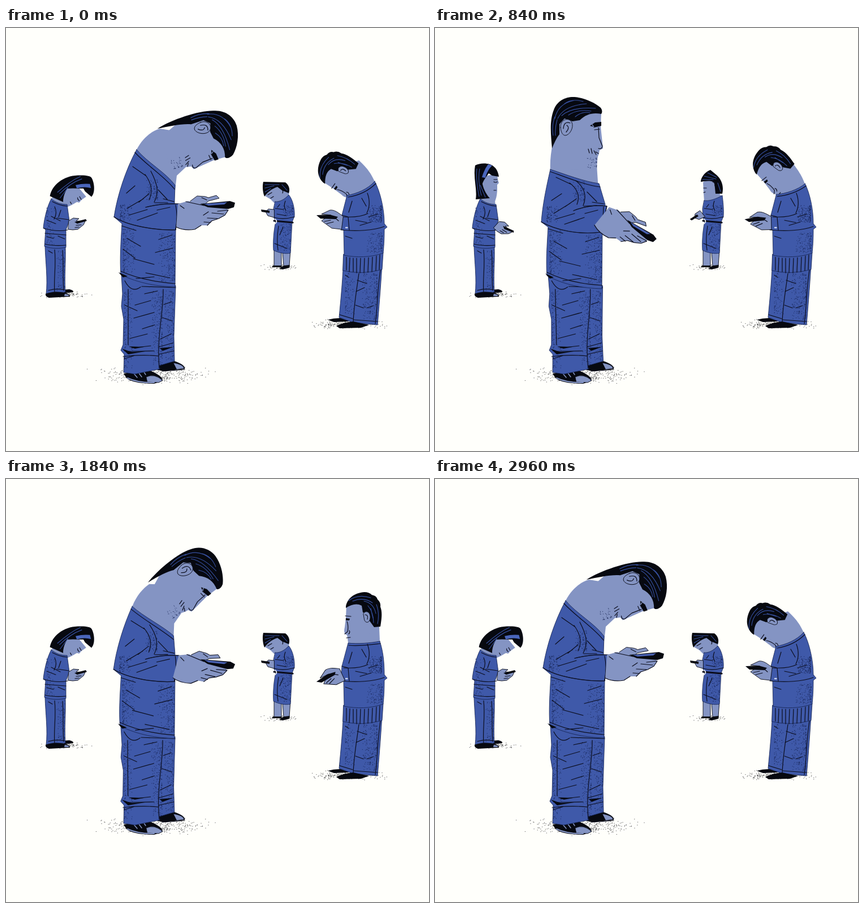
Write an HTML page that moves like this. It is 748 by 748 pixels and loops after 3000 ms.

```html
<!DOCTYPE html>
<html lang="en">
<head>
<meta charset="utf-8">
<title>Heads down</title>
<style>
  html, body { margin: 0; width: 100%; height: 100%; overflow: hidden; background: #fffffb; }
  svg { display: block; width: 100vw; height: 100vh; }
  path { stroke-linejoin: round; stroke-linecap: round; }
  .b { fill: #3f59a9; stroke: #14214f; stroke-width: .8; }
  .s { fill: #8494c3; }
  .o { fill: #8494c3; stroke: #0b0d18; stroke-width: .9; }
  .k { fill: #070910; }
  .l { fill: none; stroke: #0b0d1c; stroke-width: 1.2; }
  .h { fill: none; stroke: #3650a0; stroke-width: 1.1; }
  .belt { fill: none; stroke: #0b0d1c; stroke-width: 3; }
  .dots { fill: none; stroke: #14204f; stroke-width: .8; }
  .dust { fill: none; stroke: #1a1a1e; stroke-width: .8; }
</style>
</head>
<body>
<!-- data-up / data-down: path when the head is raised / lowered; data-bow: turn when lowered; data-drop: turn when raised -->
<svg viewBox="0 0 748 748">

  <g id="girl">
    <path class="dust" data-dust="102 472 50 6 110"/>
    <path class="k" d="M98 463L112 462Q120 464 119 467L104 469Z"/>
    <path class="b" d="M69 386C70 415 74 445 71 470L105 467C103 440 106 415 105 386Z"/>
    <path class="k" d="M70 470Q85 464 104 468Q115 471 113 475L76 477Q69 475 70 470Z"/>
    <path class="s" d="M104 470L112 472L110 474L103 474Z"/>
    <path class="l" d="M86 392C89 420 84 445 86 468M100 393C102 415 100 440 102 464M75 394L82 398M75 464Q90 460 103 463"/>
    <path class="dots" data-dots="104 392 90 464 90"/>
    <path class="s" d="M80 303C87 288 96 282 107 276L130 290L110 304L108 317L90 314Z"
      data-up="M80 303C79 294 80 288 82 282L92 276L109 288L106 304L107 317L85 312Z"/>
    <g data-bow="60 93 301 3 4">
      <path class="s" d="M82 292L86 262L110 258L111 268L113 274L110 277L110 288Q109 302 105 308L93 308Z"/>
      <path class="l" d="M104 272Q107 274 110 272M108 287L104 287M104 268L110 268"/>
      <path class="k" d="M71 243C80 238 98 238 105 246C110 250 112 257 113 263L101 261L95 257C90 264 85 270 84 276C86 286 92 296 97 301L72 303C75 285 67 265 71 243Z"
        data-down="M70 252C76 240 82 233 86 233C96 233 112 240 115 250L101 255L95 255C90 264 84 272 81 280C85 288 92 295 98 298L77 313C62 300 58 275 70 252Z"/>
      <path class="h" d="M74 249Q72 268 78 298M79 249Q75 270 82 296M80 278L89 299"/>
      <path d="M83 264Q87 250 94 241L101 243Q92 252 89 265Z" fill="#4a66bb"/>
    </g>
    <path class="b" d="M80 302C73 315 68 335 66 353L70 357L68 386C82 391 95 390 106 388L106 357L112 341L108 312C98 312 88 309 80 302Z"/>
    <path class="l" d="M66 354C80 358 96 360 109 357M90 336L111 339M86 316C90 324 89 331 85 338M97 322L93 334M72 340L88 346M80 333L96 341M69 363L106 366M72 369L84 372M92 368L104 373M69 382Q85 386 106 384M82 307Q95 314 108 315"/>
    <path class="dots" data-dots="72 318 86 384 60"/>
    <g data-drop="38 112 350 -3 0">
      <path class="o" d="M111 341L119 336L129 337L124 341L140 342L137 348L127 356L118 357L110 356Z"/>
      <path class="k" d="M121 343L141 338L143 341L126 346Z"/>
      <path class="l" d="M124 349L133 348M122 353L129 352"/>
    </g>
  </g>

  <g id="woman">
    <path class="dust" data-dust="483 423 34 5 70"/>
    <path class="o" d="M474 392L474 421L487 423L487 396L489 396L491 421L501 420L503 393Z"/>
    <path class="k" d="M472 420L487 420L487 423L470 423ZM483 425L492 420L502 419L501 424L489 427Z"/>
    <path class="b" d="M477 342C473 360 472 380 473 393C483 398 495 400 503 398L506 342Z"/>
    <path class="l" d="M482 350Q478 375 481 393M475 381L497 390M490 352L484 366"/>
    <path class="dots" data-dots="503 346 484 395 110"/>
    <path class="s" d="M458 297C462 290 470 284 478 280L501 287C501 291 500 295 499 298L484 308L474 309L468 303Z"
      data-up="M474 273C480 268 485 266 490 265L498 270C499 285 500 292 508 298L490 308L476 307L475 292Z"/>
    <path class="l" d="M463 295L470 291M473 298L468 301M487 285Q491 287 489 292" data-up="M475 283L480 283M478 290L475 291M491 272Q496 274 495 279"/>
    <path class="k" d="M455 272L494 273C500 277 503 285 500 292L488 287L480 281C470 284 462 291 457 298C454 290 453 280 455 272Z"
      data-up="M487 251L498 260C507 268 511 280 508 293L496 293L494 273C486 269 478 271 470 272C470 266 475 256 487 251Z"/>
    <path class="h" d="M458 277L483 277M458 283L474 279M458 290L468 284M488 277L497 287"
      data-up="M482 256L498 264M476 262L497 267M473 268L492 268M500 274L505 289"/>
    <path class="b" d="M476 307C484 308 493 303 500 295C507 303 511 320 510 333L506 343L477 342L474 336L473 320Z"
      data-up="M476 305C484 307 498 302 508 296C509 305 511 320 510 333L506 343L477 342L474 336L473 320Z"/>
    <path class="l" d="M510 334C496 338 485 338 474 335M476 319L491 321M494 306Q490 315 495 323M484 312L480 317M479 329L496 332"/>
    <path class="dots" data-dots="507 314 490 332 70"/>
    <path class="belt" d="M474 341L507 344"/>
    <path d="M476 338Q481 342 476 346" fill="none" stroke="#fffffb" stroke-width="1.6"/>
    <g data-drop="-40 474 330 0 0">
      <path class="o" d="M474 321L464 320L459 325L463 332L474 335Z"/>
      <path class="k" d="M451 321L466 323L466 327L452 325Z"/>
    </g>
  </g>

  <g id="guest">
    <path class="dust" data-dust="607 524 82 8 230"/>
    <path class="k" d="M569 516Q585 511 603 514L606 519L580 520Z"/>
    <path class="b" d="M597 402C596 440 592 480 589 512L614 521L657 525C660 490 664 440 666 400Z"/>
    <path class="k" d="M584 527Q597 520 614 519L642 525L628 530L590 531Z"/>
    <path class="l" d="M624 434C620 465 615 490 614 521M662 428C657 460 657 495 653 523M590 507L613 514M615 516L657 519M621 446L638 452M619 466L634 459M600 437L606 441M618 490L632 495M638 495L650 491"/>
    <path class="dots" data-dots="656 434 630 516 240"/>
    <path class="dots" data-dots="600 434 616 506 90"/>
    <path class="b" d="M597 400L667 397L665 427Q630 437 596 429Z"/>
    <path class="l" d="M602 405V428M608 406L607 431M614 407V431M620 407V433M627 407L626 433M634 407L633 433M641 406L640 432M648 405L647 431M655 403L654 429M661 401L660 427"/>
    <path class="s" d="M652 272C645 255 635 244 624 234L596 245L582 280L603 298L625 305Z"
      data-up="M661 290C661 280 660 270 660 258L630 240L603 258L605 292L630 302Z"/>
    <g data-bow="-60 620 286 4 2">
      <path class="s" d="M602 222L601 245L599 262Q596 274 603 276L605 287L632 290L652 258L645 215Z"/>
      <path class="k" d="M601 246L608 247L607 250L601 250Z"/>
      <path class="l" d="M603 252Q606 260 604 270L599 274M602 281L609 280M600 242L610 243M606 274Q609 271 607 268"/>
      <path class="k" d="M601 225C604 210 617 201 634 200Q642 200 647 205Q655 206 657 213Q663 218 662 226C666 236 664 248 662 261L651 262L643 251L640 238L631 236L629 224C620 219 611 222 601 228Z"/>
      <path class="h" d="M606 215Q622 203 645 210M613 216Q632 208 648 219M633 216Q650 219 654 238M640 224Q650 236 650 254M655 222Q661 238 657 256M645 229L649 246"/>
      <path class="o" d="M632 238C636 231 645 235 644 246C643 254 637 256 634 250Z"/>
      <path class="l" d="M635 240Q641 240 639 248"/>
    </g>
    <path class="b" d="M652 271C662 290 669 320 669 346L674 352L669 356C669 375 668 388 667 398C645 406 620 406 598 402L597 357L592 356L594 331L603 296C620 293 640 285 652 271Z"
      data-up="M661 287C666 302 669 320 669 346L674 352L669 356C669 375 668 388 667 398C645 406 620 406 598 402L597 357L592 356L594 331L605 290C622 292 645 290 661 287Z"/>
    <path class="l" d="M592 357C620 360 650 358 669 351M597 334C615 335 630 333 640 328M594 331L605 334L607 357M639 292C644 305 643 318 638 327M629 301L637 315M612 306L606 326M618 340L638 344M626 349L646 343M641 334L657 329M600 368L612 372"/>
    <path class="l" d="M605 299C624 296 642 287 654 275" data-up="M606 294C624 296 645 293 662 291"/>
    <path class="dots" data-dots="664 314 642 344 200"/>
    <path class="dots" data-dots="665 362 638 398 130"/>
    <path d="M601 353h2.4" stroke="#c8d2ef" stroke-width="2.4"/>
    <g data-drop="-32 597 345 0 0">
      <path class="o" d="M596 333C588 327 581 321 573 322L558 329L575 331L562 338L558 341L576 354L593 356Z"/>
      <path class="k" d="M549 331L572 330L587 334L583 338L556 337Z"/>
      <path class="l" d="M563 342L574 340M567 346L579 343M580 334L588 341"/>
    </g>
  </g>

  <g id="man">
    <path class="dust" data-dust="258 614 116 15 420"/>
    <path class="k" d="M268 596L298 589Q318 596 316 603L278 607L266 604Z"/>
    <path class="o" d="M296 592Q314 595 315 602L302 604Z"/>
    <path class="l" d="M276 607L316 604"/>
    <path class="k" d="M208 611L250 604Q278 615 277 624L262 629Q225 629 213 619Z"/>
    <path class="o" d="M248 617Q262 610 277 623L270 627L250 626Z"/>
    <path d="M226 611L232 618M234 609L240 617M243 607L247 613" stroke="#8494c3" stroke-width="1.5"/>
    <path d="M215 619Q235 628 262 627" stroke="#8494c3" stroke-width="2" fill="none"/>
    <g data-skew="1.3 610">
      <path class="b" d="M204 436L206 470L204 492L208 515L207 560L203 570L209 577L208 609L228 612L272 603L271 597L298 589L297 545L300 456Z"/>
      <path class="l" d="M278 462C279 500 266 545 271 602M210 447Q222 470 238 458M240 457L300 459M207 581Q240 577 270 580M270 577L297 571M209 585L228 579M222 566L256 562M216 572L262 571M245 470L268 465M210 490L232 500M228 490L256 482M226 513L262 503M219 549L250 541M241 532L263 525M279 489L293 484M276 512L294 518M273 550L292 541M270 564L295 557M216 462V560"/>
      <path class="k" d="M205 567L222 573L246 572L216 577ZM272 566L296 564L277 571ZM217 563L244 564L228 567Z"/>
      <path class="dots" data-dots="276 465 258 596 250"/>
      <path class="dots" data-dots="296 465 281 588 200"/>
      <path class="dots" data-dots="209 465 224 604 160"/>
    </g>
    <path class="s" d="M231 215C242 194 258 182 272 178L350 190L318 246L302 261L299 287L240 250Z"
      data-up="M204 252C203 236 205 220 208 205L260 185L289 218L286 242L289 287L220 272Z"/>
    <g data-bow="72 286 261 -3 -7">
      <path class="s" d="M207 206L220 150L294 148L293 175L296 203L297 213L291 216L290 222L287 230L286 252L225 250Z"/>
      <path class="k" d="M277 171L283 167L294 166L294 173L281 176ZM278 170L274 173L282 175Z"/>
      <path class="l" d="M289 176L290 194L296 209Q295 215 289 213M289 222L284 219M271 214L273 221M276 213L278 222M281 217L285 224M282 180L291 179"/>
      <path class="k" d="M207 213C205 190 202 165 210 145C216 128 232 121 247 122C266 124 282 132 293 141C296 145 296 149 294 152C280 149 267 152 256 163L243 165L229 160L220 170L220 188C215 194 210 205 207 213Z"
        data-down="M209 252C201 222 201 170 210 146C216 126 232 117 247 117C266 118 284 128 294 139C298 146 298 152 294 154C280 149 267 152 256 163L243 165L229 160L220 170L220 193C214 206 211 232 209 252Z"/>
      <path class="h" d="M212 160Q217 134 246 128M217 160Q228 137 268 134M224 155Q241 139 284 142M236 154Q252 143 276 147M209 190Q206 173 212 157M213 190Q212 176 216 162M248 157Q260 147 274 150M229 134Q242 124 262 130"/>
      <path class="o" d="M222 176C221 161 237 157 242 167C246 176 238 190 230 190C225 189 223 184 222 176Z"/>
      <path class="l" d="M227 178Q228 164 239 168M233 172Q239 176 232 184"/>
      <path class="dots" data-dots="286 230 268 248 35"/>
    </g>
    <path class="b" d="M231 215C212 250 197 295 191 334L205 346C203 380 201 410 203 436C235 452 270 457 299 458L300 356L298 307L299 278C282 255 250 238 231 215Z"
      data-up="M204 250C196 285 190 315 188 343L200 352C198 385 196 415 198 438C230 455 262 460 295 461L296 360L301 312L290 275C265 272 228 258 204 250Z"/>
    <path class="l" d="M228 220C250 244 280 262 298 285" data-up="M204 254C230 263 265 278 292 281"/>
    <path class="b" d="M191 334C215 350 265 358 300 357L307 311C280 310 262 313 247 317"
      data-up="M188 343C215 358 255 366 293 361L304 315C280 312 260 317 245 323"/>
    <path class="l" d="M191 334C215 350 265 358 300 357L307 311C280 310 262 313 247 317"
      data-up="M188 343C215 358 255 366 293 361L304 315C280 312 260 317 245 323"/>
    <path class="l" d="M256 253C266 272 272 289 262 308M246 259C257 274 260 290 253 304M224 245L247 261M235 308L253 293M217 331L250 321M232 340L268 327M269 286L285 303M278 302L297 307M213 292L228 279M267 322L290 317M214 319L243 302M263 309L286 309"
      data-up="M249 270C262 280 270 295 262 314M238 274C252 284 257 298 251 312M214 264L242 277M230 316L250 302M213 338L247 328M229 347L264 335M269 290L286 307M278 308L299 311M206 305L224 293M265 328L288 322M210 328L239 310M263 315L286 314"/>
    <path class="l" d="M300 313Q304 332 300 356M205 350L230 358M214 372L238 386M225 408L262 418M207 391L228 407M270 374L294 366M264 397L295 389M247 433L290 442M203 430Q240 447 299 452M230 443L262 440"
      data-up="M298 316Q298 335 292 360M200 355L226 363M210 377L233 390M220 412L257 421M202 395L223 410M266 378L290 370M260 400L291 393M243 436L286 445M198 432Q235 451 295 455M226 447L258 443"/>
    <path class="k" d="M199 432L215 439L207 441Z" data-up="M195 434L210 441L203 443Z"/>
    <g data-drop="0 0 0 -4 3">
      <path class="dots" data-dots="298 362 270 448 240"/>
      <path class="dots" data-dots="207 355 228 432 190"/>
      <path class="dots" data-dots="268 268 248 304 100"/>
      <path class="dots" data-dots="202 312 222 340 100"/>
    </g>
    <g data-drop="35 305 335 -10 2">
      <g id="thumb">
        <path class="o" d="M326 306L338 297L352 298L358 300L372 296L377 301L358 306L350 313L330 313Z"/>
        <path class="l" d="M346 300L355 304"/>
      </g>
      <path class="s" d="M304 311L322 306L350 313L388 317L393 322L387 331L376 337L364 341L356 349L345 349L334 356L316 357L301 352Z"/>
      <path class="l" d="M318 307L350 314M392 322L374 324M385 329L364 327M374 337L356 336M358 325L349 331M362 344L350 343M301 352Q315 359 334 356L345 349M308 314L315 319M356 349L364 341L376 337L387 331L393 322"/>
      <path class="k" d="M343 311L396 306L405 309L403 317L393 320L357 317Z"/>
      <path d="M350 311L391 308L386 312L358 314Z" fill="#4961b0"/>
    </g>
  </g>
</svg>
<script>
  const LOOP = 3000;
  // rise start, rise end, fall start, fall end
  const people = {
    girl: [300, 520, 1540, 1720],
    woman: [320, 540, 1360, 1580],
    man: [620, 830, 1680, 1930],
    guest: [740, 1040, 1860, 2130]
  };

  let seed = 7;
  const rnd = () => (seed = seed * 16807 % 2147483647) / 2147483647;
  const nums = s => s.match(/-?[\d.]+/g).map(Number);
  const all = (root, q) => [...root.querySelectorAll(q)];
  const dot = (x, y) => `M${x.toFixed(1)} ${y.toFixed(1)}h.3`;
  const fill = (n, make) => Array.from({ length: n }, make).join('');

  for (const p of all(document, '[data-dots]')) {
    const [x0, y0, x1, y1, n] = nums(p.dataset.dots);
    p.setAttribute('d', fill(n, () => dot(x0 + (x1 - x0) * rnd() ** 2, y0 + (y1 - y0) * rnd())));
  }
  for (const p of all(document, '[data-dust]')) {
    const [cx, cy, rx, ry, n] = nums(p.dataset.dust);
    const spread = () => (rnd() + rnd() + rnd()) / 1.5 - 1;
    p.setAttribute('d', fill(n, () => dot(cx + rx * spread() * 1.1, cy + ry * spread() * 1.3)));
  }

  const ease = x => { x = Math.min(1, Math.max(0, x)); return x * x * (3 - 2 * x); };
  const raised = (t, [a, b, c, d]) => ease((t - a) / (b - a)) - ease((t - c) / (d - c));

  function morph(el) {
    const own = el.getAttribute('d'), { up = own, down = own } = el.dataset;
    const a = nums(down), b = nums(up), parts = own.split(/-?[\d.]+/);
    return k => el.setAttribute('d', parts.map((s, i) =>
      i < a.length ? s + (a[i] + (b[i] - a[i]) * k).toFixed(2) : s).join(''));
  }
  function turn(el, spec, amount) {
    const [r, x, y, dx, dy] = nums(spec);
    return k => {
      const m = amount(k);
      el.setAttribute('transform', `translate(${dx * m} ${dy * m}) rotate(${r * m} ${x} ${y})`);
    };
  }
  function skew(el) {
    const [angle, y] = nums(el.dataset.skew);
    return k => el.setAttribute('transform', `translate(0 ${y}) skewX(${angle * k}) translate(0 ${-y})`);
  }

  const rigs = Object.entries(people).map(([id, times]) => {
    const g = document.getElementById(id);
    const moves = [
      ...all(g, '[data-up], [data-down]').map(morph),
      ...all(g, '[data-bow]').map(e => turn(e, e.dataset.bow, k => 1 - k)),
      ...all(g, '[data-drop]').map(e => turn(e, e.dataset.drop, k => k)),
      ...all(g, '[data-skew]').map(skew)
    ];
    return { times, moves };
  });
  const thumb = document.getElementById('thumb');

  function draw() {
    const t = performance.now() % LOOP;
    for (const { times, moves } of rigs) {
      const k = raised(t, times);
      moves.forEach(move => move(k));
    }
    const tap = (1 - Math.cos(t / 240 * 2 * Math.PI)) * (1 - raised(t, people.man));
    thumb.setAttribute('transform', `rotate(${tap * 2} 328 308)`);
    requestAnimationFrame(draw);
  }
  draw();
</script>
</body>
</html>
```
